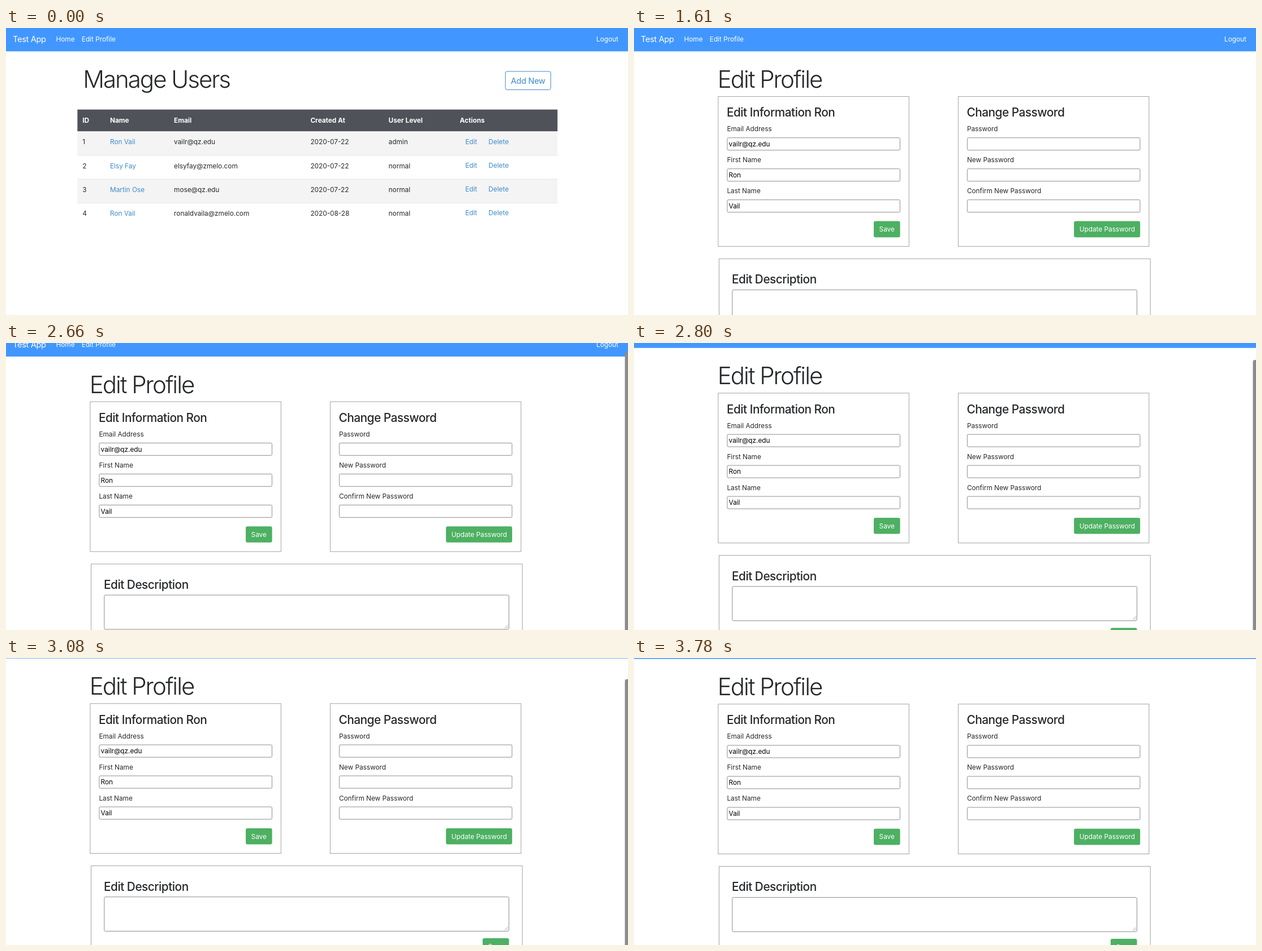
These frames come from a looping animation (1100 by 509 pixels, 4.55 s). An HTML page:

```html
<!DOCTYPE html>
<html lang="en">
<head>
<meta charset="utf-8">
<title>Test App</title>
<style>
  html, body { margin: 0; width: 100%; height: 100%; overflow: hidden; background: #fff; }
  svg { display: block; }
  text { font: 400 11.8px Inter, sans-serif; font-optical-sizing: none; fill: #25282b; white-space: pre; }
  .white { fill: #fff; }
  .link { fill: #3d8bcb; }
  .input { fill: #000; }
  .bold { font-weight: 700; fill: #fff; }
  .large { font-size: 14.6px; letter-spacing: -.33px; }
  .heading { font-size: 20.8px; font-weight: 500; letter-spacing: -.48px; }
  .title { font-size: 42px; font-weight: 300; letter-spacing: -2px; }
  .nav { fill: #4197ff; }
  .head { fill: #4f5259; }
  .stripe { fill: #f4f4f4; }
  .rule { fill: #e1e4e7; }
  .button { fill: #4db062; }
  .panel { fill: none; stroke: #a3a3a3; }
  .field { fill: #fff; stroke: #8e8e8e; }
  .outline { fill: none; stroke: #3d8bcb; }
  .grip { fill: none; stroke: #888; stroke-width: .8; }
</style>
</head>
<body>
<svg id="stage" width="1100" height="509" viewBox="0 0 1100 509"></svg>
<script>
const LOOP = 4550, STEP = 70;
const OPEN_PROFILE = 1400, SCROLL_START = 2450, SCROLL_END = 2940, SETTLE = 3010, FADE_START = 3570, FADE_END = 3780;
const SCROLL_REST = 39.8, SCROLL_MAX = 40.7;

const text = (x, y, string, style = '') => `<text x="${x}" y="${y}" class="${style}">${string}</text>`;
const rect = (x, y, w, h, style, r = 0) =>
  `<rect x="${x}" y="${y}" width="${w}" height="${h}" rx="${r}" class="${style}"/>`;

function navbar() {
  return rect(0, 0, 1100, 41.4, 'nav') +
    text(12, 25, 'Test App', 'white large') +
    text(88.5, 24.3, 'Home', 'white') +
    text(133.8, 24.3, 'Edit Profile', 'white') +
    text(1044, 24.3, 'Logout', 'white');
}

function usersPage() {
  const columns = [135.3, 184, 297.1, 538.4, 676.6, 802.5];
  const labels = ['ID', 'Name', 'Email', 'Created At', 'User Level', 'Actions'];
  const users = [
    ['Ron Vail', 'vailr@qz.edu', '2020-07-22', 'admin'],
    ['Elsy Fay', 'elsyfay@zmelo.com', '2020-07-22', 'normal'],
    ['Martin Ose', 'mose@qz.edu', '2020-07-22', 'normal'],
    ['Ron Vail', 'ronaldvaila@zmelo.com', '2020-08-28', 'normal'],
  ];
  const rows = users.map((user, i) => {
    const top = 183.4 + i * 42.15, base = top + 23;
    return (i % 2 ? '' : rect(126.3, top, 849, 42.15, 'stripe')) +
      (i ? rect(126.3, top, 849, 1, 'rule') : '') +
      [i + 1, ...user].map((cell, c) => text(columns[c], base, cell, c === 1 ? 'link' : '')).join('') +
      text(812.2, base - .4, 'Edit', 'link') +
      text(853.3, base - .4, 'Delete', 'link');
  });
  return navbar() +
    text(136.2, 106, 'Manage Users', 'title') +
    rect(883.2, 77, 80.2, 32.5, 'outline', 3) +
    text(892.8, 98.7, 'Add New', 'link large') +
    rect(126.3, 144.6, 849, 38.8, 'head') +
    labels.map((label, c) => text(columns[c], 168, label, 'bold')).join('') +
    rows.join('');
}

function button(x, y, w, label) {
  return rect(x, y, w, 28.6, 'button', 3) + text(x + 9.6, y + 18.7, label, 'white');
}

function formPanel(x, title, fields, action, actionWidth) {
  const inputs = fields.map(([label, value], i) => {
    const y = i * 55;
    return text(x + 15.5, 183.3 + y, label) +
      rect(x + 16, 194.7 + y, 305.5, 22, 'field', 2) +
      text(x + 18.7, 210 + y, value, 'input');
  });
  return rect(x, 121.5, 337.4, 265.8, 'panel') +
    text(x + 15, 157.3, title, 'heading') +
    inputs.join('') +
    button(x + 321.7 - actionWidth, 342.6, actionWidth, action);
}

function profilePage() {
  return navbar() +
    text(147.8, 106, 'Edit Profile', 'title') +
    formPanel(148.9, 'Edit Information Ron',
      [['Email Address', 'vailr@qz.edu'], ['First Name', 'Ron'], ['Last Name', 'Vail']], 'Save', 46.6) +
    formPanel(573.4, 'Change Password',
      [['Password', ''], ['New Password', ''], ['Confirm New Password', '']], 'Update Password', 117) +
    rect(150.5, 409.3, 762.7, 182, 'panel') +
    text(173, 453.3, 'Edit Description', 'heading') +
    rect(173.8, 464.4, 715.6, 60.8, 'field', 2) +
    '<path class="grip" d="M882 523.5l6-6M885.5 523.5l2.5-2.5"/>' +
    button(842.9, 537.8, 46.6, 'Save');
}

const stage = document.getElementById('stage');
stage.innerHTML = `<g id="users">${usersPage()}</g><g id="profile">${profilePage()}</g>` +
  '<rect id="thumb" x="1094.5" width="9" height="600" rx="4" fill="#8b8b8b"/>';
const [users, profile, thumb] = stage.children;

const clamp = v => Math.min(1, Math.max(0, v));

function scrollAt(t) {
  if (t >= SETTLE) return t <= FADE_START ? SCROLL_MAX : SCROLL_REST;
  const u = clamp((t - SCROLL_START) / (SCROLL_END - SCROLL_START));
  return SCROLL_REST * (1 - (1 - u ** 1.64) ** 2);
}

function draw() {
  const t = Math.floor(performance.now() % LOOP / STEP) * STEP;
  const scroll = scrollAt(t), onProfile = t >= OPEN_PROFILE;
  users.style.display = onProfile ? 'none' : '';
  profile.style.display = onProfile ? '' : 'none';
  profile.setAttribute('transform', `translate(0 ${-scroll})`);
  thumb.setAttribute('y', scroll * .92);
  thumb.setAttribute('opacity', t > SCROLL_START ? clamp((FADE_END - t) / (FADE_END - FADE_START)) : 0);
  requestAnimationFrame(draw);
}
draw();
</script>
</body>
</html>
```
